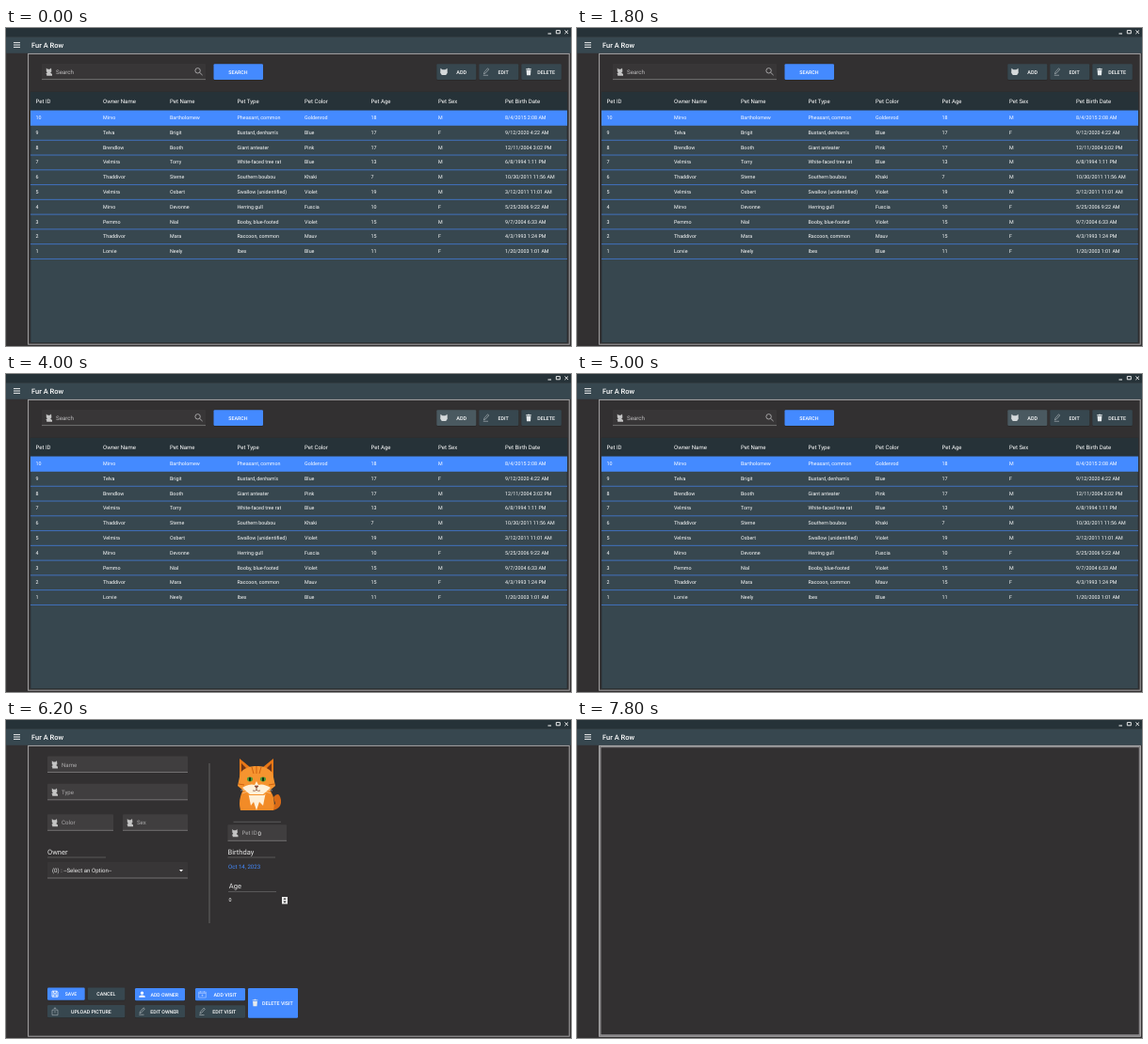
An HTML page that plays this animation: 600 px wide and 338 px high, repeating every 8 s.

```html
<!DOCTYPE html>
<html lang="en">
<head>
<meta charset="utf-8">
<title>Pet list</title>
<style>
  html, body { margin: 0; width: 100%; height: 100%; overflow: hidden; background: #323031; }
  svg { display: block; width: 100vw; height: 100vh; }
  text { font-family: Roboto, sans-serif; text-rendering: geometricPrecision; white-space: pre; }
</style>
</head>
<body>
<svg id="stage" viewBox="0 0 600 338"></svg>
<script>
const BLUE = '#448aff', SLATE = '#37474f', DARK = '#263238', PANEL = '#323031';
const LOOP = 8000, HOVER_AT = 2600, FORM_AT = 5200, BLANK_AT = 7600;

const rect = (x, y, w, h, fill, extra = '') =>
  `<rect x="${x}" y="${y}" width="${w}" height="${h}" fill="${fill}" ${extra}/>`;
const line = (x1, y1, x2, y2, color, width = 0.7) =>
  `<path d="M${x1} ${y1}L${x2} ${y2}" stroke="${color}" stroke-width="${width}"/>`;
// y is the middle of the capital letters
const label = (x, y, str, size, fill = '#fff', weight = 400, anchor = 'start') =>
  `<text x="${x}" y="${y + size * 0.36}" font-size="${size}" fill="${fill}" font-weight="${weight}" text-anchor="${anchor}">${str}</text>`;
const shape = (x, y, d, fill, stroke = 'none', width = 0.7) =>
  `<path transform="translate(${x} ${y})" d="${d}" fill="${fill}" stroke="${stroke}" stroke-width="${width}"/>`;

// Icons are centred on 0,0
const icons = {
  cat: (x, y) => shape(x, y, 'M-3.2-4.2L-1.8-3H.6L2-4.2 2.4-.6 1.2 .6 3 2.2V4H-2.8V2.6L-3.6 1.8-2.2 .6-3.2-.8Z', '#c4c4c4'),
  head: (x, y) => shape(x, y, 'M-3.6-3.8L-1.6-2.4H1.6L3.6-3.8 3.8 1 2.2 3.4H-2.2L-3.8 1Z', '#d5d9db'),
  pencil: (x, y) => shape(x, y, 'M-2.6 2.2L-1.9.1 1.5-3.8 2.8-2.7-.6 1.2ZM-3.2 3.6H2', 'none', '#b9c1c5', 0.6),
  trash: (x, y) => shape(x, y, 'M-2.8-3.4H-1L-.6-4H.6L1-3.4H2.8V-2.5H-2.8ZM-2.4-1.9H2.4L2 3.5H-2Z', '#e6eaec'),
  save: (x, y) => shape(x, y, 'M-3-3H2.2L3-2.2V3H-3ZM-1.5-3V-.8H1.4V-3M-1.8 3V.8H1.8V3', 'none', '#fff', 0.8),
  user: (x, y) => shape(x, y, 'M0-3.2A1.7 1.7 0 0 1 0 .2 1.7 1.7 0 0 1 0-3.2M-3.2 3V1.8Q0-.2 3.2 1.8V3Z', '#fff'),
  visit: (x, y) => shape(x, y, 'M-3.8-2.6H3.8V3.4H-3.8ZM-3.8-1.2H3.8M-2-3.6V-2M2-3.6V-2M-1 1H1M0 0V2', 'none', '#b9d2ff', 0.6),
  upload: (x, y) => shape(x, y, 'M-1.2-1.4H-3V4H3V-1.4H1.2M0 2V-3.8M-1.5-2.3L0-3.9 1.5-2.3', 'none', '#aeb8bc', 0.6)
};

function button(x, y, w, h, str, textX, fill, icon, iconX, size = 5.3) {
  return rect(x, y + 0.7, w, h, '#222', 'rx="1.2" opacity=".55"') + rect(x, y, w, h, fill, 'rx="1.2"') +
    (icon ? icons[icon](iconX, y + h / 2) : '') + label(textX, y + h / 2 + 0.1, str, size, '#fff', 500);
}

function field(x, y, w, str, textX = x + 15) {
  return rect(x, y, w, 17, '#403e3f', 'rx="1"') + line(x, y + 17, x + w, y + 17, '#8b8a8b') +
    icons.cat(x + 8, y + 9) + label(textX, y + 9, str, 6.1, '#aaa9aa');
}

const heading = (x, y, str, x1, x2) =>
  label(x, y, str, 7.5, '#e8e8e8') + line(x1, y + 6, x2, y + 6, '#757475', 0.6);

const columns = [31.5, 103, 174, 245.5, 317, 387.5, 459, 530];
const titles = 'Pet ID|Owner Name|Pet Name|Pet Type|Pet Color|Pet Age|Pet Sex|Pet Birth Date'.split('|');
const pets = `10|Mirvo|Bartholomew|Pheasant, common|Goldenrod|18|M|8/4/2015 2:08 AM
9|Telva|Brigit|Bustard, denham's|Blue|17|F|9/12/2020 4:22 AM
8|Brendlow|Booth|Giant anteater|Pink|17|M|12/11/2004 3:02 PM
7|Velmira|Torry|White-faced tree rat|Blue|13|M|6/8/1994 1:11 PM
6|Thaddivor|Sterne|Southern boubou|Khaki|7|M|10/30/2011 11:56 AM
5|Velmira|Osbert|Swallow (unidentified)|Violet|19|M|3/12/2011 11:01 AM
4|Mirvo|Devonne|Herring gull|Fuscia|10|F|5/25/2006 9:22 AM
3|Pemmo|Nial|Booby, blue-footed|Violet|15|M|9/7/2004 6:33 AM
2|Thaddivor|Mara|Raccoon, common|Mauv|15|F|4/3/1993 1:24 PM
1|Lorvie|Neely|Ibex|Blue|11|F|1/20/2003 1:01 AM`.split('\n').map(row => row.split('|'));

function windowFrame() {
  return rect(0, 0, 600, 338, PANEL) + rect(0, 0, 600, 9.5, DARK) + rect(0, 9.5, 600, 17.3, SLATE) +
    line(0.3, 27, 0.3, 338, '#454445', 0.6) +
    [15.6, 18, 20.4].map(y => line(8, y, 15, y, '#fff', 0.9)).join('') +
    label(27, 18.1, 'Fur A Row', 7.5, '#fff', 500) +
    line(575.5, 6, 579, 6, '#fff', 1) +
    shape(586.3, 4.2, 'M-2-1.6H2V1.6H-2Z', 'none', '#fff', 0.9) +
    shape(595.2, 4.3, 'M-1.8-1.8L1.8 1.8M1.8-1.8L-1.8 1.8', 'none', '#fff', 0.9) +
    rect(23.6, 27.4, 574.6, 308.8, 'none', 'stroke="#a8a7a8" stroke-width="1"');
}

function listView() {
  const step = 15.77;
  const search = rect(38, 38, 174, 16.5, '#383637', 'rx="1"') + line(38, 54.6, 212, 54.6, '#8b8a8b') +
    icons.cat(46, 46.8) + label(53, 46.4, 'Search', 6.2, '#bdbcbd') +
    shape(204, 45.5, 'M2.3-.2A2.7 2.7 0 1 1-3.1-.2 2.7 2.7 0 1 1 2.3-.2M1.6 1.8L4.6 4.6', 'none', '#b0afb0', 0.9) +
    button(220.5, 38.3, 52.5, 16.7, 'SEARCH', 236.2, BLUE);
  const tools = `<g id="add">${button(457.3, 38.3, 42, 16.7, 'ADD', 478.3, SLATE, 'head', 465, 5.5)}</g>` +
    button(502.3, 38.3, 42, 16.7, 'EDIT', 522.5, SLATE, 'pencil', 510) +
    button(547.3, 38.3, 42.5, 16.7, 'DELETE', 564.3, SLATE, 'trash', 555);
  const table = rect(26, 68, 570, 266.5, SLATE, 'stroke="#262a2d" stroke-width=".6"') +
    rect(26, 68, 570, 19.6, DARK) + rect(26, 87.6, 570, 15.8, BLUE) +
    titles.map((str, i) => label(columns[i], 77.8, str, 6.05)).join('') +
    pets.map((pet, r) =>
      pet.map((str, i) => label(columns[i], 95.2 + r * step, str, 5.35)).join('') +
      line(26, 103.5 + r * step, 596, 103.5 + r * step, '#4684ee', 0.7)).join('');
  return search + tools + table;
}

function portrait() {
  const ear = 'M-18-25L-7-16-18-5Z';
  const eye = x => `<ellipse cx="${x}" cy="-3" rx="3" ry="2.4" fill="#4d9a35"/><ellipse cx="${x}" cy="-3" rx="1" ry="2.2" fill="#172012"/>`;
  return `<g transform="translate(266 66)">` +
    shape(0, 0, 'M11 30Q27 31 26 19 24 9 18 16L20 23Z', '#d96a16') +
    shape(0, 0, 'M-14 8Q-20 19-17 30H18Q21 16 13 7Z', '#f28b27') +
    shape(0, 0, 'M-9 10L-6 25-3 21 0 30 3 21 7 25 10 10Z', '#fff0d8') +
    shape(0, 0, ear, '#e97716') + `<g transform="scale(-1 1)">${shape(0, 0, ear, '#e97716')}</g>` +
    shape(0, 0, 'M-16-20L-10-14-16-8ZM16-20L10-14 16-8Z', '#6f3517') +
    shape(0, 0, 'M-17-10Q-10-18 0-17 10-18 17-10L20 4 14 9 8 14H-8L-14 9-20 4Z', '#f6942f') +
    shape(0, 0, 'M-5-16L-3-9M0-17V-9M5-16L3-9M-19 2L-13 3M19 2L13 3', 'none', '#cf6110', 1) +
    shape(0, 0, 'M-15 6Q-7 1-2 3L0-1 2 3Q7 1 15 6L7 13H-7Z', '#fff0d8') +
    eye(-7) + eye(7) + shape(0, 0, 'M-2 4H2L0 6.5ZM0 6V8.5M-4 9Q-1 10 0 8 1 10 4 9', '#a7503b', '#6f3d2a', 0.6) +
    shape(0, 0, 'M-6 7L-17 9M-6 8.5L-15 12M6 7L17 9M6 8.5L15 12', 'none', '#fff5e8', 0.4) + '</g>';
}

function formView() {
  const inputs = field(44, 38.5, 149, 'Name') + field(44, 67.8, 149, 'Type') +
    field(44, 100.3, 70, 'Color') + field(124, 100.3, 69, 'Sex') +
    heading(44, 140, 'Owner', 44, 106) +
    rect(44, 151, 149, 17, '#383637', 'rx="1"') + line(44, 168, 193, 168, '#8b8a8b') +
    label(49, 159.8, '(0) : --Select an Option--', 6.1, '#e8e8e8') +
    shape(186, 160, 'M-2-1H2L0 1.2Z', '#fff');
  const details = line(216, 46, 216, 216, '#737273', 0.8) + portrait() +
    line(241.5, 108.3, 292, 108.3, '#757475', 0.6) + field(235.5, 111.3, 62.5, 'Pet ID', 250.5) +
    label(267.5, 120.3, '0', 6.2) +
    heading(235.6, 140, 'Birthday', 235.5, 286) + label(236, 155.7, 'Oct 14, 2023', 6.1, BLUE) +
    heading(236.8, 176.5, 'Age', 236, 287) + label(236.5, 191.2, '0', 5.4) +
    rect(293, 188, 6, 7.5, '#eee') + shape(296, 191.7, 'M-1.6-.9L0-2.7 1.6-.9ZM-1.6.9L0 2.7 1.6.9Z', '#222');
  const buttons = button(44, 284.5, 39.7, 13.3, 'SAVE', 62.7, BLUE, 'save', 52, 5.1) +
    button(86.8, 284.5, 39.5, 13.3, 'CANCEL', 96.3, SLATE) +
    button(44, 303, 82.3, 13.3, 'UPLOAD PICTURE', 69, SLATE, 'upload', 52) +
    button(137, 285, 53, 13.3, 'ADD OWNER', 153.5, BLUE, 'user', 144.5, 5.2) +
    button(137, 303, 53, 13.3, 'EDIT OWNER', 153.3, SLATE, 'pencil', 144.5, 5.2) +
    button(201, 285, 53, 13.3, 'ADD VISIT', 220.5, BLUE, 'visit', 208.5) +
    button(201, 303.2, 53, 13.5, 'EDIT VISIT', 219.3, SLATE, 'pencil', 208.5) +
    button(257, 285, 53, 31.7, 'DELETE VISIT', 272, BLUE, 'trash', 264.5);
  return inputs + details + buttons;
}

const blankView = () =>
  rect(24.4, 28.2, 573.4, 307.2, 'none', 'stroke="#a8a7a8" stroke-width="2"') +
  rect(24.4, 28.2, 573.4, 307.2, 'none', 'stroke="#5c5b5c" stroke-width=".4"');

const stage = document.getElementById('stage');
stage.innerHTML = windowFrame() +
  [listView, formView, blankView].map(view => `<g class="view">${view()}</g>`).join('');
const views = stage.querySelectorAll('.view');
const addFace = stage.querySelectorAll('#add rect')[1];

function draw(now) {
  const t = now % LOOP;
  const current = t < FORM_AT ? 0 : t < BLANK_AT ? 1 : 2;
  views.forEach((view, i) => view.setAttribute('display', i === current ? 'inline' : 'none'));
  addFace.setAttribute('fill', t < HOVER_AT ? SLATE : '#4a5960');
  requestAnimationFrame(draw);
}
draw(0);
</script>
</body>
</html>
```
